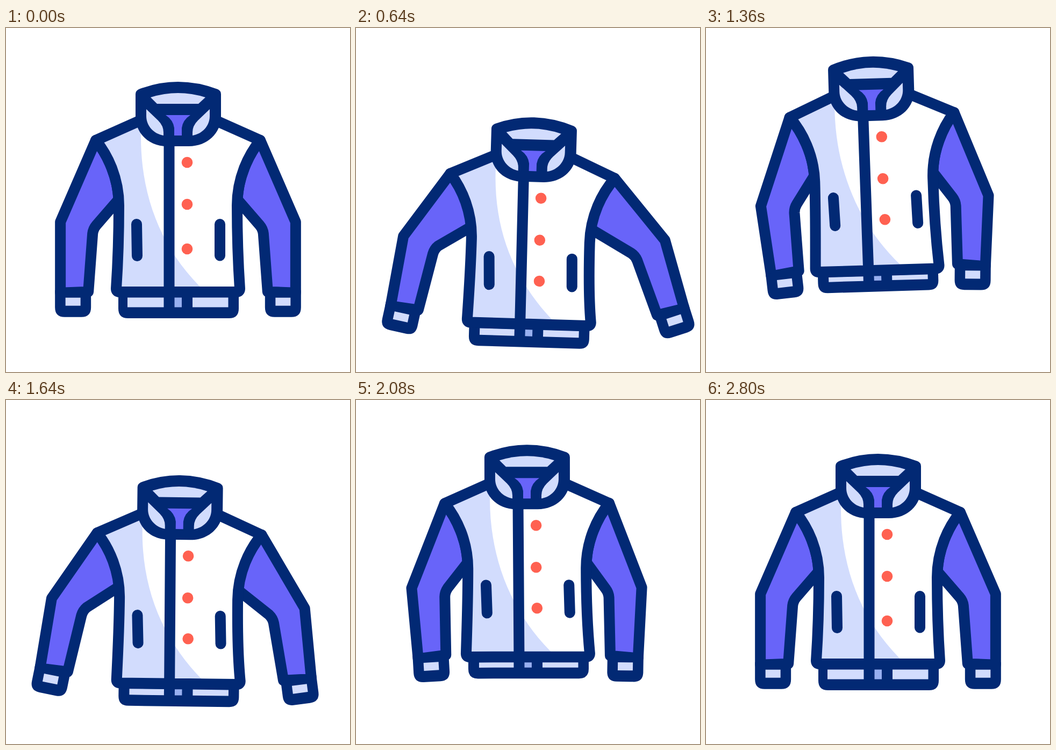
An HTML page that plays this animation: 640x640 px, repeating every 3000 ms.

```html
<!DOCTYPE html>
<html lang="en">
<head>
<meta charset="utf-8">
<title>Varsity jacket</title>
<style>
  html, body { margin: 0; width: 100%; height: 100%; overflow: hidden; background: #fff; }
  svg { display: block; width: 100%; height: 100%; }
  .line { stroke: #022974; stroke-width: 20; stroke-linecap: round; stroke-linejoin: round; }
  .none { fill: none; }
  .dark { fill: #022974; }
  .white { fill: #fff; }
  .light { fill: #d2dcfd; }
  .purple { fill: #6864f9; }
  .blue { fill: #98b0f0; }
  .red { fill: #ff6151; }
</style>
</head>
<body>
<svg viewBox="0 0 640 640">
  <defs>
    <g id="cuff">
      <path class="dark" d="M91 488H158V520Q158 538 140 538H109Q91 538 91 520Z"/>
      <path class="light" d="M110.500 502H138.500V517H110.500Z"/>
    </g>
    <path id="flap" class="light" d="M261 151L283 172Q293 182 293 194V200C275 197 261 182 261 164Z"/>
  </defs>

  <g class="arm">
    <path class="sleeve line purple"/>
    <use class="hand" href="#cuff"/>
  </g>
  <g class="arm" transform="matrix(-1 0 0 1 640 0)">
    <path class="sleeve line purple"/>
    <use class="hand" href="#cuff"/>
  </g>

  <g id="body">
    <g id="hem">
      <path id="hemBand" class="dark"/>
      <path id="hemLight" class="light"/>
      <path id="hemBlue" class="blue"/>
    </g>
    <path id="torso" class="white"/>
    <path id="shade" class="light"/>
    <path id="outline" class="line none"/>
    <path id="pockets" class="line none"/>
    <g class="red">
      <circle cx="337" cy="250" r="10.300"/>
      <circle cx="337" cy="328" r="10.300"/>
      <circle id="button" r="10.300"/>
    </g>
    <path class="dark" d="M241 123Q241 117 247 114Q283 100 320 100Q357 100 394 114Q400 117 400 123V165C400 195 375 220 340 220H300C265 220 241 195 241 165Z"/>
    <path class="light" d="M269 129Q320 113 371 129L358 141H281Z"/>
    <path class="purple" d="M297 162H343Q329 171 327 186V200H313V186Q311 171 297 162Z"/>
    <use href="#flap"/>
    <use href="#flap" transform="matrix(-1 0 0 1 640 0)"/>
  </g>
</svg>
<script>
const LOOP = 3000, START = 200, SPAN = 520, STEP = 40;

// One value per swing, SPAN ms apart
const keys = {
  drop:  [0, 68, -59.5, 47, -34, 0],
  tilt:  [0, 1.75, -2.05, 0.9, -0.35, 0],
  morph: [0, 1, 1, 1, 1, 0]
};
const arms = [
  { side: 1,  swing: [0, 15.3, -8.4, 14.2, -6.8, 0], fore: [0, 10.7, -11.1, 10.9, -9.7, 0], shrink: 1.2 },
  { side: -1, swing: [0, 18.2, -2.5, 8.6, -5.6, 0],  fore: [0, 16.2, -3.6, 6, -5.4, 0],     shrink: 0.75 }
];

const $ = id => document.getElementById(id);
const set = (el, name, value) => el.setAttribute(name, value);
const rad = deg => deg * Math.PI / 180;
const groups = document.querySelectorAll('.arm');
arms.forEach((arm, i) => {
  arm.sleeve = groups[i].querySelector('.sleeve');
  arm.hand = groups[i].querySelector('.hand');
});

// cubic-bezier(.45, 0, .42, 1)
function ease(x) {
  let lo = 0, hi = 1;
  for (let i = 0; i < 24; i++) {
    const t = (lo + hi) / 2, u = 1 - t;
    if (1.35 * t * u * u + 1.26 * t * t * u + t ** 3 < x) lo = t; else hi = t;
  }
  return lo * lo * (3 - 2 * lo);
}

function sampler(time) {
  const pos = Math.min(Math.max((time - START) / SPAN, 0), 5);
  const i = Math.min(Math.floor(pos), 4);
  const e = ease(pos - i);
  return list => list[i] + (list[i + 1] - list[i]) * e;
}

function turn(x, y, deg) {
  const c = Math.cos(rad(deg)), s = Math.sin(rad(deg));
  return [x * c - y * s, x * s + y * c];
}

// The upper body leans left by slide; the lower parts stay in place
function drawBody({ drop, tilt, morph, slide }) {
  const seam = 491 - 0.12 * drop + 1.5 * morph;
  const base = 540 - 0.09 * drop - 6.5 * morph;
  const top = seam + 10.5, low = base - 20.5, left = 226 + 3 * morph;
  const leftSide = `M250 172L167 209C190 237 210 280 210 330C210 390 208 440 ${205 + slide} ${seam - 6}q0 6 6 6`;
  const torso = `${leftSide}H${429 + slide}q6 0 6 -6C432 440 430 390 430 330C430 280 450 237 473 209L390 172`;
  const box = (x1, x2) => `M${x1} ${top}H${x2}V${low}H${x1}Z`;

  set($('body'), 'transform', `translate(${-slide} ${drop}) rotate(${tilt} 320 540)`);
  set($('hem'), 'transform', `translate(${slide} 0)`);
  set($('hemBand'), 'd', `M209 ${seam}V${base - 18}Q209 ${base} 227 ${base}H415Q433 ${base} 433 ${base - 18}V${seam}Z`);
  set($('hemLight'), 'd', box(left, 293.5) + box(347, 413.5));
  set($('hemBlue'), 'd', box(313.5, 327));
  set($('torso'), 'd', torso + 'Z');
  set($('shade'), 'd', `${leftSide}H${371 + 2 * slide}C${285 + 2 * slide} ${seam - 81} 244 300 252 172Z`);
  set($('outline'), 'd', `${torso}M303.500 210L${303.5 + slide} ${seam}`);
  const up = 365 - 4 * morph, down = 424 - 11 * morph;
  set($('pockets'), 'd', `M${243 + slide / 2} ${up}L${244 + slide} ${down}M398 ${up}L${398 + slide} ${down - 0.5}`);
  set($('button'), 'cx', 337 + slide);
  set($('button'), 'cy', 411 - 7 * morph);
}

// Both arms are computed as the left one; the right group is mirrored
function drawArm(arm, at, { drop, tilt, morph, slide }) {
  const swing = at(arm.swing), fore = at(arm.fore);
  const onBody = (x, y) => {
    const [dx, dy] = turn(x - 320, y - 540, tilt * arm.side);
    return [320 + dx - slide * arm.side, 540 + dy + drop];
  };
  const [ax, ay] = onBody(169, 229);
  const angle = rad(23.6 + swing), reach = 147 - arm.shrink * swing;
  const ex = ax - reach * Math.sin(angle), ey = ay + reach * Math.cos(angle);
  const onFore = (x, y) => {
    const [dx, dy] = turn(x - 110, y - 364, fore);
    return [ex + dx, ey + dy];
  };
  const lift = 0.85 * Math.max(0, swing);
  const path = [
    'M', onBody(167, 209), 'L', onFore(101, 361), onFore(101, 493), onFore(153, 491),
    onFore(161, 383), 'Q', onFore(162, 374), onFore(168, 367),
    'L', onBody(209.5, 319 - lift),
    'C', onBody(208, 280 - lift / 3), onBody(190, 237), onBody(167, 209), 'Z'
  ];
  set(arm.sleeve, 'd', path.map(p => p.length === 2 ? p.map(n => n.toFixed(2)).join(' ') : p).join(' '));
  set(arm.hand, 'transform', `translate(${ex} ${ey}) rotate(${fore}) translate(-110 -364) rotate(${2 * morph} 125 493)`);
}

function frame(now) {
  const at = sampler(Math.floor(now % LOOP / STEP) * STEP);
  const pose = { drop: at(keys.drop), tilt: at(keys.tilt), morph: at(keys.morph) };
  pose.slide = 1.5 * pose.morph;
  drawBody(pose);
  arms.forEach(arm => drawArm(arm, at, pose));
}

const begin = performance.now();
function tick() {
  frame(performance.now() - begin);
  requestAnimationFrame(tick);
}
tick();
</script>
</body>
</html>
```
